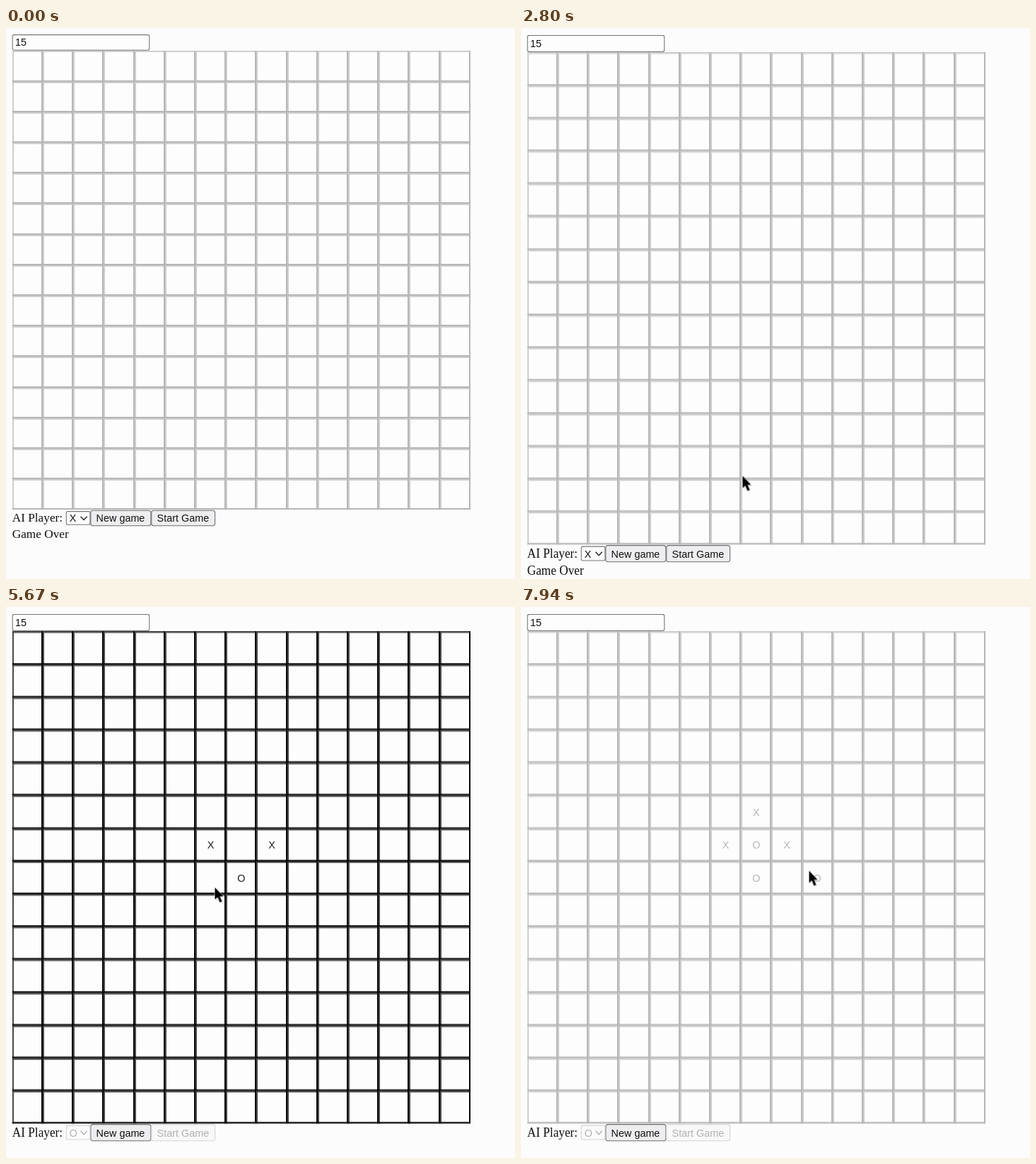
These frames come from a looping animation (720x778 px, 8000 ms). An HTML page:

```html
<!DOCTYPE html>
<html lang="en">
<head>
<meta charset="utf-8">
<title>Board game</title>
<style>
html, body { margin: 0; width: 100%; height: 100%; overflow: hidden; background: #fcfcfd; }
svg { display: block; width: 720px; height: 778px; }
text { font: 14.4px "Liberation Sans", Arial, sans-serif; fill: #111; }
.serif { font: 17.28px "Liberation Serif", "Times New Roman", serif; }
.btn { fill: #eeeef0; stroke: #6c6c6e; stroke-width: 1.08; }
.field { fill: #fdfdfd; stroke: #767678; stroke-width: 1.08; }
.dim .btn { fill: #f8f8f9; stroke: #d3d3d5; }
.dim .field { fill: #fbfbfc; stroke: #d3d3d5; }
.dim text { fill: #b0b0b2; }
.chev { fill: none; stroke: #222; stroke-width: 1.4; }
.dim .chev { stroke: #b0b0b2; }
#marks text { fill: inherit; text-anchor: middle; }

/* hard changes */
#page, #idle, #play, #before, #after, #marks, #marks text {
  animation: 8s step-end infinite;
}
#page { animation-name: stretch; }
#idle { animation-name: idle; }
#play { animation-name: play; }
#before { animation-name: before; }
#after { animation-name: after; }
#marks { animation-name: ink; }
#marks text:nth-child(1) { animation-name: m1; }
#marks text:nth-child(2) { animation-name: m2; }
#marks text:nth-child(3) { animation-name: m3; }
#marks text:nth-child(4) { animation-name: m4; }
#marks text:nth-child(5) { animation-name: m5; }
#marks text:nth-child(6) { animation-name: m6; }
@keyframes stretch { 0% { transform: none } .75%, 100% { transform: scaleY(1.0725) } }
@keyframes idle {
  0%, 53.5%, 76.9%, 96.25%, 100% { opacity: 1 }
  39.25%, 64.13%, 87.9% { opacity: 0 }
}
@keyframes play {
  0%, 53.5%, 76.9%, 96.25%, 100% { opacity: 0 }
  39.25%, 64.13%, 87.9% { opacity: 1 }
}
@keyframes ink {
  0%, 53.5%, 76.9%, 96.25%, 100% { fill: #b4b4b5 }
  39.25%, 64.13%, 87.9% { fill: #1c1c1c }
}
@keyframes before { 0% { opacity: 1 } 39.25%, 100% { opacity: 0 } }
@keyframes after { 0% { opacity: 0 } 39.25%, 100% { opacity: 1 } }
@keyframes m1 { 0% { opacity: 0 } 43.38%, 100% { opacity: 1 } }
@keyframes m2 { 0% { opacity: 0 } 53.5%, 100% { opacity: 1 } }
@keyframes m3 { 0% { opacity: 0 } 64.13%, 100% { opacity: 1 } }
@keyframes m4 { 0% { opacity: 0 } 76.9%, 100% { opacity: 1 } }
@keyframes m5 { 0% { opacity: 0 } 87.9%, 100% { opacity: 1 } }
@keyframes m6 { 0% { opacity: 0 } 96.25%, 100% { opacity: 1 } }

#cursor { animation: move 8s linear infinite; }
@keyframes move {
  0%, 7% { transform: translate(724px, 398px) }
  9.375%, 9.6% { transform: translate(536px, 438px) }
  10.625% { transform: translate(270px, 511px) }
  12.5% { transform: translate(120px, 640px) }
  14.4% { transform: translate(38px, 705px) }
  18.6%, 24.75% { transform: translate(118px, 747px) }
  27.5% { transform: translate(190px, 620px) }
  30.6% { transform: translate(300px, 440px) }
  31.9% { transform: translate(316px, 411px) }
  33.1% { transform: translate(318px, 450px) }
  34.5% { transform: translate(317px, 552px) }
  35%, 35.3% { transform: translate(313.5px, 632.5px) }
  37%, 43.4% { transform: translate(238px, 752px) }
  47%, 47.5% { transform: translate(338.5px, 410px) }
  50%, 53.5% { transform: translate(334px, 378px) }
  57% { transform: translate(310px, 391px) }
  61%, 70.4% { transform: translate(292px, 400px) }
  70.875%, 71.7% { transform: translate(295.5px, 396px) }
  75.6%, 80.6% { transform: translate(330px, 332px) }
  84.25%, 85.1% { transform: translate(386.5px, 323.5px) }
  87.5%, 90.7% { transform: translate(402px, 320px) }
  95%, 100% { transform: translate(407.5px, 372.5px) }
}
</style>
</head>
<body>
<svg viewBox="0 0 720 778">
  <g id="page">
    <rect class="field" x="9.2" y="9.6" width="193.6" height="21.6" rx="2.5"/>
    <text x="13" y="25.2">15</text>

    <rect x="9" y="32.4" width="648" height="648" fill="#fdfdfd"/>
    <g id="idle"><path class="lit" fill="#ceced2"/><path class="shade" fill="#b6b6b7"/></g>
    <g id="play"><path class="lit" fill="#4a4a4b"/><path class="shade" fill="#070707"/></g>
    <g id="marks">
      <text x="289.6" y="318.2">X</text>
      <text x="332.8" y="361.4">O</text>
      <text x="376" y="318.2">X</text>
      <text x="332.8" y="318.2">O</text>
      <text x="332.8" y="275">X</text>
      <text x="419.2" y="361.4">O</text>
    </g>

    <text class="serif" x="8.7" y="697">AI Player:</text>
    <rect class="btn" x="119.9" y="681.2" width="85" height="21.6" rx="3"/>
    <text x="127.6" y="697">New game</text>
    <g id="before">
      <rect class="field" x="85.3" y="682.6" width="33.6" height="18.6" rx="2"/>
      <text x="89.8" y="697">X</text>
      <path class="chev" d="M105.5 689.8l4.6 4.6l4.6-4.6"/>
      <rect class="btn" x="205.8" y="681.2" width="89.8" height="21.6" rx="3"/>
      <text x="213.6" y="697">Start Game</text>
      <text class="serif" x="8.7" y="719.6">Game Over</text>
    </g>
    <g id="after" class="dim">
      <rect class="field" x="85.3" y="682.6" width="33.6" height="18.6" rx="2"/>
      <text x="89.8" y="697">O</text>
      <path class="chev" d="M105.5 689.8l4.6 4.6l4.6-4.6"/>
      <rect class="btn" x="205.8" y="681.2" width="89.8" height="21.6" rx="3"/>
      <text x="213.6" y="697">Start Game</text>
    </g>
  </g>
  <g id="cursor">
    <path d="M1.5 2V19L5.4 15.4L8.4 22.6L11.6 21.2L8.6 14.2H13.6Z" fill="#000" opacity=".13"/>
    <path d="M0 0V17L3.9 13.5L6.8 21L10 19.7L7 12.6H12Z" fill="#000" stroke="#fff" stroke-width="1" paint-order="stroke"/>
  </g>
</svg>
<script>
const N = 15, PITCH = 43.2, LEFT = 8.8, TOP = 32.3, SIZE = N * PITCH, W = 2;

// bevel strips of all cells, at the near or the far edge
function strips(far) {
  let d = "";
  for (let i = 0; i < N; i++) {
    const o = (i + far) * PITCH - far * W;
    const x = Math.round(LEFT + o), y = Math.round(TOP + o);
    d += `M${x} ${TOP}h${W}v${SIZE}h${-W}z`;
    d += `M${LEFT} ${y}h${SIZE}v${W}h${-SIZE}z`;
  }
  return d;
}

document.querySelectorAll(".lit").forEach(p => p.setAttribute("d", strips(0)));
document.querySelectorAll(".shade").forEach(p => p.setAttribute("d", strips(1)));
</script>
</body>
</html>
```
